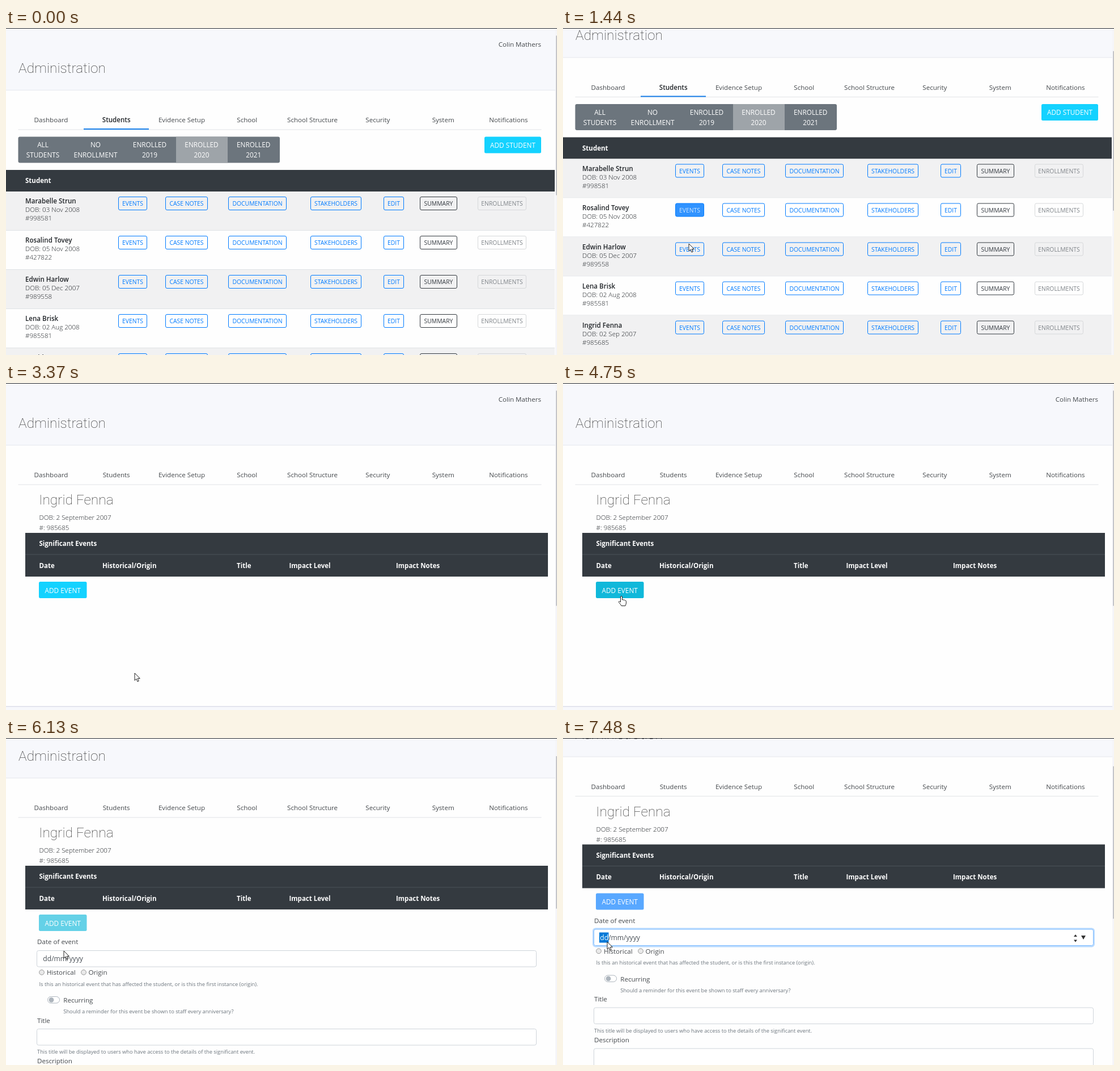
Recreate the animation shown at these times as an HTML page. Size 972 px wide and 576 px high, loop 8000 ms.

```html
<!DOCTYPE html>
<html lang="en">
<head>
<meta charset="utf-8">
<title>Administration</title>
<style>
html, body { margin: 0; width: 100%; height: 100%; overflow: hidden; background: #fefefe; }
svg { display: block; width: 972px; height: 576px; }
text { font: 11.6px 'Open Sans', 'Noto Sans', sans-serif; fill: #45494d; white-space: pre; }
.mid { text-anchor: middle; }
.end { text-anchor: end; }
.title { font: 200 24.5px Roboto, sans-serif; fill: #333; }
.thin { font-weight: 300; fill: #212529; }
.semi { font-weight: 600; fill: #212529; }
.head { font-weight: 700; font-size: 11.5px; fill: #fff; }
.white { fill: #fff; font-size: 11.8px; }
.small { font-size: 10.4px; }
.help { font-size: 9.3px; fill: #6c757d; }
.date { font-size: 12.1px; fill: #495057; }
.field { fill: #fff; stroke: #ced4da; }
</style>
</head>
<body>
<svg id="stage" viewBox="0 0 972 576"></svg>
<script>
const LOOP = 8000, OPEN_PAGE = 3370, OPEN_FORM = 5270, FOCUS = 6820;
const FADE = 150, SCROLL = 76.5, HOVER_LAG = 40;

const students = [
  ['Marabelle Strun', '03 Nov 2008', '998581'],
  ['Rosalind Tovey', '05 Nov 2008', '427822'],
  ['Edwin Harlow', '05 Dec 2007', '989558'],
  ['Lena Brisk', '02 Aug 2008', '985581'],
  ['Ingrid Fenna', '02 Sep 2007', '985685'],
  ['Mirabela Thornsen', '11 Oct 2007', '985702']
];
const BLUE = '#007bff', DARK = '#343a40';
const actions = [
  ['EVENTS', 198.5, 50, BLUE], ['CASE NOTES', 281.5, 74, BLUE], ['DOCUMENTATION', 392.5, 102, BLUE],
  ['STAKEHOLDERS', 537.5, 89, BLUE], ['EDIT', 666.5, 35, BLUE], ['SUMMARY', 730.5, 65, DARK],
  ['ENROLLMENTS', 832.5, 85, null]
];
// time, x, y of the pointer tip
const pointerPath = [
  [30, 788, 555], [200, 660, 470], [400, 450, 360], [560, 335, 314], [650, 285, 325], [750, 256, 339],
  [980, 256, 339], [1120, 240, 358], [1300, 222, 380], [2100, 222, 380], [2400, 226, 452],
  [2510, 226, 477], [2700, 227, 500], [2860, 227, 511], [4030, 227, 511], [4280, 170, 440],
  [4450, 115, 386], [4620, 103, 376], [5900, 103, 376], [6000, 102, 375], [6230, 102, 375],
  [6500, 80, 361], [6770, 68, 357], [7410, 68, 357], [7470, 77.5, 358.5], [8000, 77.5, 358.5]
];

const text = (x, y, s, cls = '', extra = '') => `<text x="${x}" y="${y}" class="${cls}" ${extra}>${s}</text>`;
const rect = (x, y, w, h, fill, extra = '') =>
  `<rect x="${x}" y="${y}" width="${w}" height="${h}" ${fill ? `fill="${fill}"` : ''} ${extra}/>`;
const field = (y, h, id = '') => rect(54.5, y, 881, h, '', `class="field" rx="3" ${id}`);

const clamp = v => Math.min(1, Math.max(0, v));
const smooth = (t, a, b) => { const u = clamp((t - a) / (b - a)); return u * u * (3 - 2 * u); };
const mix = (a, b, f) => `color-mix(in srgb, ${b} ${(f * 100).toFixed(1)}%, ${a})`;

function frameMarkup() {
  const tabs = ['Dashboard', 'Students', 'Evidence Setup', 'School', 'School Structure', 'Security', 'System', 'Notifications'];
  return rect(0, 0, 969, 109, '#f7f8fc') + rect(0, 109, 969, 1, '#e5e8ee') +
    text(944, 33, 'Colin Mathers', 'end') + text(22, 78.8, 'Administration', 'title') +
    tabs.map((s, i) => text(79.4 + 115.3 * i, 166, s, 'mid', `id="tab${i}"`)).join('') +
    rect(21.5, 178.5, 923, 1, '#e2e4e7');
}

function listMarkup() {
  const filters = [['ALL', 'STUDENTS', 65], ['NO', 'ENROLLMENT', 158], ['ENROLLED', '2019', 253.5],
    ['ENROLLED', '2020', 345], ['ENROLLED', '2021', 436.7]];
  const rows = students.map(([name, born, number], i) => {
    const y = 69 * i;
    return rect(0, 288 + y, 968, 68, i % 2 ? '#fefefe' : '#f1f1f2') + rect(0, 356 + y, 968, 1, '#dfe2e5') +
      text(34, 309 + y, name, 'semi') + text(34, 324 + y, 'DOB: ' + born, 'thin') +
      text(34, 339 + y, '#' + number, 'thin') +
      actions.map(([label, x, w, color]) =>
        `<g class="${color ? 'action' : ''}">` +
        rect(x, 297.5 + y, w, 23, color || 'none', `fill-opacity="0" rx="2.5" stroke="${color || '#d6d8da'}"`) +
        text(x + w / 2, 313 + y, label, 'mid small', `style="fill:${color || '#7f8489'}"`) + '</g>').join('');
  });
  return rect(137, 177, 115, 2, '#1a80ea') +
    rect(21.5, 191.5, 461.5, 46, '#6c757d', 'rx="3"') + rect(300, 191.5, 91, 46, '#9ea4a9') +
    filters.map(([a, b, x]) => text(x, 210, a, 'mid white') + text(x, 228, b, 'mid white')).join('') +
    rect(844, 191.5, 100, 29, '#14d2ff', 'rx="2.5"') + text(894, 210.5, 'ADD STUDENT', 'mid white') +
    rect(0, 250, 968, 38, DARK) + text(34, 273, 'Student', 'head') + rows.join('');
}

function eventsMarkup() {
  const columns = [['Date', 58.5], ['Historical/Origin', 170], ['Title', 407], ['Impact Level', 499.5], ['Impact Notes', 688]];
  return text(58, 214, 'Ingrid Fenna', 'title') + text(58.5, 241, 'DOB: 2 September 2007', 'thin') +
    text(58.5, 259, '#: 985685', 'thin') +
    rect(34, 264, 922, 77, DARK) + rect(34, 301.5, 922, 1, '#4b5259') +
    text(58.5, 287, 'Significant Events', 'head') + columns.map(([s, x]) => text(x, 325.5, s, 'head')).join('') +
    rect(58, 350, 84.5, 29, '#14d2ff', 'rx="2.5" id="addEvent"') + text(100.2, 369.5, 'ADD EVENT', 'mid white') +
    `<g id="pageEnd">${rect(0, 569, 969, 7, '#f7f8fc') + rect(0, 569, 969, 1.5, '#dddfe9')}</g>` +
    `<g id="form">${formMarkup()}</g>`;
}

function formMarkup() {
  const radio = x => `<circle cx="${x}" cy="451.8" r="4.4" fill="#e9e9e9" stroke="#999"/>`;
  return text(55, 402, 'Date of event') +
    rect(53.3, 412.2, 883.4, 31.4, 'none', 'id="glow" rx="4" stroke="#007bff" stroke-opacity=".27" stroke-width="2.6"') +
    field(413.5, 28.5, 'id="dateField"') +
    rect(64, 419, 16.5, 18, '#0078d7', 'id="selection"') +
    text(65.3, 432, '<tspan id="day">dd</tspan>/mm/yyyy', 'date') +
    '<path id="spinner" fill="#333" d="M901 426.5h6l-3-4zM901 432h6l-3 4zM914 424.5h8l-4 7z"/>' +
    radio(63) + text(72, 456, 'Historical') + radio(137) + text(145.5, 456, 'Origin') +
    text(58.5, 475.5, 'Is this an historical event that has affected the student, or is this the first instance (origin).', 'help') +
    rect(73.5, 494.5, 21, 11.5, '#fff', 'rx="5.7" stroke="#adb5bd"') + '<circle cx="80" cy="500.3" r="4.4" fill="#adb5bd"/>' +
    text(101.3, 505, 'Recurring') +
    text(101.3, 524, 'Should a reminder for this event be shown to staff every anniversary?', 'help') +
    text(55, 540.7, 'Title') + field(551.5, 28.5) +
    text(55, 595, 'This title will be displayed to users who have access to the details of the significant event.', 'help') +
    text(55, 612, 'Description') + field(623.5, 80);
}

const $ = id => document.getElementById(id);
$('stage').innerHTML = rect(0, 0, 972, 576, '#fefefe') +
  `<g id="page">${frameMarkup()}<g id="list">${listMarkup()}</g><g id="events">${eventsMarkup()}</g></g>` +
  rect(969, 0, 3, 576, '#f5f5f8') + rect(970.3, 13, 1.7, 281, '#bcbdc1', 'id="thumb"') +
  rect(0, 0, 972, 1, '#26282b') +
  `<g id="pointer" fill="#fff" stroke="#222" stroke-linejoin="round">
    <path id="arrow" d="M0 0V13L3 10.2L5 15L7.2 14L5.2 9.4H9.3Z"/>
    <path id="hand" d="M-1.5 10V1Q-1.5 -.5 0 -.5T1.5 1V6Q3 5 4.2 6.4Q5.6 5.6 6.6 7Q8.4 6.8 8.4 8.6V12Q8 14 7 16.5H0Q-1 14 -4.5 10.5Q-5.5 9 -3.8 8.6Q-2.5 9 -1.5 10Z"/>
  </g>`;

const buttons = [...document.querySelectorAll('.action')].map(g => {
  const [box, label] = g.children;
  const [x, y, w, h] = ['x', 'y', 'width', 'height'].map(k => +box.getAttribute(k));
  return { box, label, x, y, w, h, color: box.getAttribute('fill') };
});
const addEvent = { x: 58, y: 350, w: 84.5, h: 29 };

const show = (id, on) => { $(id).style.display = on ? '' : 'none'; };

const scrollAt = t => SCROLL * (t < OPEN_PAGE ? smooth(t, 1340, 1490) : smooth(t, 6055, 6205));

function pointerAt(t) {
  const i = pointerPath.findIndex(p => p[0] > t);
  if (i < 1) return null;
  const [t0, x0, y0] = pointerPath[i - 1], [t1, x1, y1] = pointerPath[i];
  const u = (t - t0) / (t1 - t0);
  return { x: x0 + (x1 - x0) * u, y: y0 + (y1 - y0) * u };
}

// Pointer positions in page coordinates over the last FADE milliseconds, newest first.
// Hover follows scrolling with a short delay, as in a browser.
const recentPoints = t => Array.from({ length: 16 }, (_, i) => {
  const time = t - i * FADE / 15, p = pointerAt(time);
  return p && { x: p.x, y: p.y + scrollAt(time - HOVER_LAG) };
});
const inside = (p, b) => p && p.x >= b.x && p.x <= b.x + b.w && p.y >= b.y && p.y <= b.y + b.h;
const hoverAmount = (points, b) => points.filter(p => inside(p, b)).length / points.length;

function render(t) {
  const onList = t < OPEN_PAGE, formOpen = t >= OPEN_FORM;
  const scroll = scrollAt(t), points = recentPoints(t), pointer = pointerAt(t);
  let overLink = false;

  show('list', onList);
  show('events', !onList);
  show('form', formOpen);
  show('pageEnd', !formOpen);
  $('tab1').setAttribute('class', onList ? 'mid semi' : 'mid');
  $('page').setAttribute('transform', `translate(0 ${-Math.round(scroll * 2) / 2})`);
  $('thumb').setAttribute('y', 13.5 + scroll * 0.475);
  $('thumb').setAttribute('height', onList ? 281 : formOpen ? 268.5 : 379);

  if (onList) {
    for (const b of buttons) {
      const f = hoverAmount(points, b);
      b.box.setAttribute('fill-opacity', f);
      b.label.style.fill = mix(b.color, '#fff', f);
      overLink ||= inside(points[0], b);
    }
  } else {
    overLink = !formOpen && inside(points[0], addEvent);
    $('addEvent').style.fill = formOpen
      ? mix('#64d1e7', '#59a8ff', clamp((t - 6230) / FADE))
      : mix('#14d2ff', '#10b8da', hoverAmount(points, addEvent));
    const focus = clamp((t - FOCUS) / FADE);
    $('glow').style.opacity = focus;
    $('dateField').style.stroke = mix('#ced4da', '#80bdff', focus);
    $('day').style.fill = focus ? '#fff' : '';
    show('selection', focus > 0);
    show('spinner', t > 6450);
  }

  show('pointer', pointer);
  show('hand', overLink);
  show('arrow', !overLink);
  if (pointer) $('pointer').setAttribute('transform', `translate(${Math.round(pointer.x)} ${Math.round(pointer.y)})`);
}

const start = performance.now();
function tick() {
  render((performance.now() - start) % LOOP);
  requestAnimationFrame(tick);
}
tick();
</script>
</body>
</html>
```
